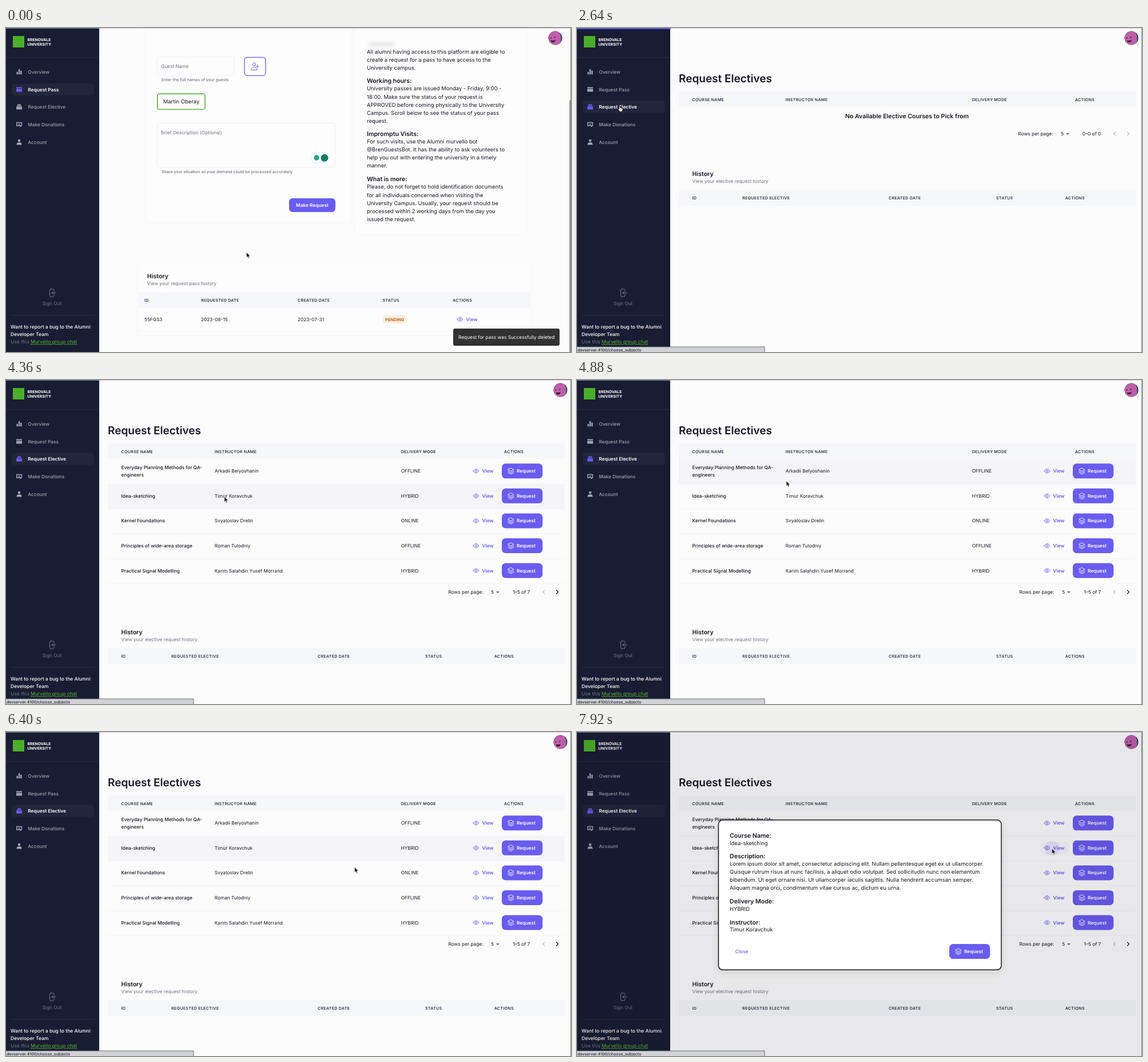
These frames come from a looping animation (988 by 567 pixels, 8000 ms). An HTML page:

```html
<!DOCTYPE html>
<html lang="en">
<head>
<meta charset="utf-8">
<title>Alumni portal</title>
<style>
html, body { margin: 0; width: 100%; height: 100%; overflow: hidden; background: #fcfcfd; }
svg { display: block; width: 100%; height: 100%; --accent: #695cf0; --ink: #15181f; --muted: #6c727e; }
text { font: 400 8.3px Inter, sans-serif; fill: var(--ink); text-rendering: geometricPrecision; white-space: pre; }
.bold { font-weight: 600; }
.medium { font-weight: 500; }
.body { font-size: 9.44px; }
.heading { font-size: 10.6px; font-weight: 600; }
.title { font-size: 19px; font-weight: 600; }
.th { font-size: 7.1px; font-weight: 600; letter-spacing: .28px; fill: #2f3746; }
.hint { font-size: 7.05px; font-weight: 500; fill: var(--muted); }
.muted { fill: var(--muted); }
.accent { fill: var(--accent); }
.white { fill: #fff; }
.nav { fill: #9da4ae; }
.brand { font-size: 6.8px; font-weight: 700; fill: #fff; }
.footer { font-size: 8.55px; }
.dim { fill: #6f7687; }
.link { fill: #55b52f; text-decoration: underline; }
.badge { font-size: 7.3px; font-weight: 600; fill: #b5560d; }
.url { font-size: 7px; font-weight: 500; fill: #222428; }
.mid { text-anchor: middle; }
.end { text-anchor: end; }
.line { fill: none; stroke: currentColor; stroke-linecap: round; stroke-linejoin: round; }
.card { fill: #fdfdfe; filter: drop-shadow(0 1px 4px #11192705); }
.input { fill: #fdfdfe; stroke: #e8eaf0; stroke-width: .7; }

.t { animation: 8s step-end infinite; }
.first { animation-name: first; }
.second { animation-name: second; }
.empty { animation-name: empty; }
.loaded { animation-name: loaded; }
.history { animation-name: history; }
.row0 { animation-name: row0; }
.row1 { animation-name: row1; }
.row2 { animation-name: row2; }
.navHover { animation-name: navHover; }
.hand { animation-name: hand; }
.arrow { animation-name: arrow; }
.status { animation-name: status; }
.viewHover { animation: viewHover 8s linear infinite; }
.statusBar { animation: statusBar 8s linear infinite; }
.toast { animation: toast 8s linear infinite; }
.progress { animation: progress 8s ease-out infinite; }
.navRipple { animation: navRipple 8s linear infinite; }
.viewRipple { animation: viewRipple 8s linear infinite; }
.modal { animation: modal 8s linear infinite; }
.cursor { animation: cursor 8s ease-in-out infinite; }

@keyframes first { 0% { opacity: 1 } 32.9%, 100% { opacity: 0 } }
@keyframes second { 0% { opacity: 0 } 32.9%, 100% { opacity: 1 } }
@keyframes empty { 0% { opacity: 1 } 53.4%, 100% { opacity: 0 } }
@keyframes loaded { 0% { opacity: 0 } 53.4%, 100% { opacity: 1 } }
@keyframes history { 0% { transform: none } 53.4%, 100% { transform: translateY(186px) } }
@keyframes row0 { 0% { opacity: 0 } 60% { opacity: 1 } 65.5%, 100% { opacity: 0 } }
@keyframes row1 { 0%, 53.4% { opacity: 1 } 60% { opacity: 0 } 65.5% { opacity: 1 } 80.4% { opacity: 0 } 83% { opacity: 1 } 98.4%, 100% { opacity: 0 } }
@keyframes row2 { 0% { opacity: 0 } 80.4% { opacity: 1 } 83%, 100% { opacity: 0 } }
@keyframes navHover { 0% { opacity: 0 } 9.5%, 100% { opacity: 1 } }
@keyframes hand { 0% { opacity: 0 } 10.9% { opacity: 1 } 41%, 100% { opacity: 0 } }
@keyframes arrow { 0% { opacity: 1 } 10.9% { opacity: 0 } 41%, 100% { opacity: 1 } }
@keyframes status { 0% { opacity: 0 } 10%, 100% { opacity: 1 } }
@keyframes statusBar { 0%, 25.5% { width: 118px } 27.5%, 100% { width: 329px } }
@keyframes toast { 0%, 28.4% { opacity: 1 } 30%, 100% { opacity: 0 } }
@keyframes progress {
  0%, 18% { width: 0; opacity: 1 }
  20% { width: 79px }
  27.5% { width: 120px }
  30%, 33% { width: 158px; opacity: .85 }
  36% { width: 988px; opacity: .85 }
  38.5%, 100% { width: 988px; opacity: 0 }
}
@keyframes navRipple {
  0%, 16.9% { r: 3px; opacity: 0 }
  17% { r: 5px; opacity: .14 }
  17.5% { r: 8px; opacity: .14 }
  22% { r: 75px; opacity: .1 }
  27%, 100% { r: 80px; opacity: 0 }
}
@keyframes viewHover { 0%, 86.5% { opacity: 0 } 89.5%, 100% { opacity: 1 } }
@keyframes viewRipple { 0%, 97.8% { r: 3px; opacity: 0 } 98% { r: 5px; opacity: .12 } 99%, 100% { r: 13px; opacity: .12 } }
@keyframes modal { 0%, 98.3% { opacity: 0 } 98.9%, 100% { opacity: 1 } }
@keyframes cursor {
  0%, .4% { transform: translate(420.5px, 392.5px) }
  10.5% { transform: translate(74px, 136px) }
  13%, 40.4% { transform: translate(73px, 136px) }
  48%, 51.5% { transform: translate(386px, 211.5px) }
  61%, 62.4% { transform: translate(366px, 176.5px) }
  72%, 73% { transform: translate(560px, 208px) }
  75.5%, 77.5% { transform: translate(590px, 222px) }
  80% { transform: translate(609.5px, 236.5px) }
  87.5%, 100% { transform: translate(830.5px, 204px) }
}
</style>
</head>
<body>
<svg id="stage" viewBox="0 0 988 567"></svg>
<script>
const text = (x, y, string, cls = '') => `<text x="${x}" y="${y}" class="${cls}">${string}</text>`;
const lines = (x, y, step, list, cls) => list.map((s, i) => text(x, y + i * step, s, cls)).join('');
const box = (x, y, w, h, r, attrs) => `<rect x="${x}" y="${y}" width="${w}" height="${h}" rx="${r}" ${attrs}/>`;
const at = (x, y, content, attrs = '') => `<g transform="translate(${x} ${y})" ${attrs}>${content}</g>`;
const stroke = (d, width = 1) => `<path class="line" stroke-width="${width}" d="${d}"/>`;
const headers = (y, cells) => Object.entries(cells).map(([name, x]) => text(x, y, name, 'th')).join('');

const view = (x, y) => at(x, y,
  stroke('M-5 0Q0-7.5 5 0Q0 7.5-5 0Z', .9) + '<circle class="line" r="1.7" stroke-width=".9"/>', 'color="#695cf0"')
  + text(x + 10.5, y + 3, 'View', 'bold accent');

const requestButton = (x, y) => box(x, y - 13, 71.3, 26, 6.5, 'class="accent"')
  + at(x + 16, y, stroke('M0-5L5-2.3 0 .4-5-2.3ZM-5 .3L0 3 5 .3M-5 2.8L0 5.5 5 2.8', .9), 'color="#fff"')
  + text(x + 26, y + 3, 'Request', 'bold white');

const navIcons = [
  '<path d="M-4.5 0h2.4v4.5h-2.4zM-1.2-4.5h2.4v9h-2.4zM2.1-2h2.4v6.5h-2.4z"/>',
  '<path d="M-5-4H5V-2H-5ZM-5-.8H5V4H-5Z"/>',
  '<path d="M-3-4.5H3V-3H-3ZM-4-2.5H4V-1H-4ZM-5-.5H5V4.5H-5Z"/>',
  '<path fill-rule="evenodd" d="M-5-4H5V3H3V5L1 3H-5ZM-3.5-2.5V1.5H3.5V-2.5Z"/><circle r="1.3"/>',
  '<circle cy="-2.5" r="2.3"/><path d="M-4.5 5Q-4.5 .6 0 .6T4.5 5Z"/>'
];
const navNames = ['Overview', 'Request Pass', 'Request Elective', 'Make Donations', 'Account'];

const sidebar = active => box(0, 0, 163, 567, 0, 'fill="#191d33"')
  + box(12, 14, 20, 20, 0, 'fill="#4bae2b"')
  + lines(37.5, 23, 8, ['BRENOVALE', 'UNIVERSITY'], 'brand')
  + box(0, 51, 163, .8, 0, 'fill="#2a3046"') + box(8, 502.5, 147, .8, 0, 'fill="#2a3046"')
  + navNames.map((name, i) => {
    const y = 76.7 + i * 30.7, on = i === active;
    return (on ? box(10, y - 10.5, 144, 21, 5, 'fill="#22263c"') : '')
      + at(23, y, navIcons[i], `fill="${on ? '#695cf0' : '#9da4ae'}"`)
      + text(38.3, y + 3.1, name, on ? 'bold white' : 'medium nav');
  }).join('')
  + at(81, 463.5, stroke('M-4.5-2.5V-5Q-4.5-6.5-3-6.5H1.5Q3-6.5 3-5V-2.5M-4.5-2.5V5Q-4.5 6.5-3 6.5H1.5Q3 6.5 3 5V2.5M6 0H-1M1-2L-1 0 1 2', .9), 'color="#858c9b"')
  + text(80.5, 485, 'Sign Out', 'mid dim')
  + lines(8, 526.3, 13, ['Want to report a bug to the Alumni', 'Developer Team'], 'footer medium white')
  + text(8, 552.3, 'Use this <tspan class="link">Murvello group chat</tspan>', 'footer dim');

const avatar = x => at(x, 17.5, `<circle r="12" fill="#17415c"/>
  <path d="M-11.5 3.5A12 12 0 0 1 7-9.7Q13 1 7.5 9.4A12 12 0 0 1-11.5 3.5Z" fill="#bd5fa9"/>
  <path d="M-7.5 4Q-3 6 .5 3Q-1 8-4.5 7.5T-7.5 4Z" fill="#201626"/>
  <circle cx="-8" cy="0" r="1" fill="#201626"/><circle cx="-1" cy="-1" r="1" fill="#201626"/>`);

const passPage = () => box(163, 0, 825, 567, 0, 'fill="#fcfcfd"')
  + box(245, -10, 358, 350, 8, 'class="card"') + box(611, -10, 299, 370, 8, 'class="card"')
  + box(232, 412, 685, 125, 8, 'class="card"')
  + box(634, 26, 44, 5, 2, 'fill="#ddd" style="filter:blur(3px)"')
  + box(264.5, 51, 134.5, 32, 5, 'class="input"') + text(271, 70.4, 'Guest Name', 'muted')
  + text(272, 93.4, 'Enter the full names of your guests', 'hint')
  + box(417, 51.3, 37, 32, 5, 'fill="#fff" stroke="#695cf0" stroke-width="1.3"')
  + at(435, 67, '<circle class="line" cx="-1" cy="-3.5" r="2.6"/>'
    + stroke('M-6 6Q-6 1.5-1 1.5T4 6ZM5-2.5V2.5M2.5 0H7.5'), 'color="#695cf0"')
  + box(264.7, 115.2, 83.3, 27.2, 3.5, 'fill="#fff" stroke="#4f9f31" stroke-width="1.4"')
  + text(274.7, 132.2, 'Martin Oberay', 'body')
  + box(264.5, 166.5, 311, 77.5, 5, 'class="input"')
  + text(271, 186, 'Brief Description (Optional)', 'muted')
  + text(272, 254, 'Share your situation so your demand could be processed accurately', 'hint')
  + box(533, 218.5, 33, 17.5, 8.7, 'fill="#fff" stroke="#e6e8ec" stroke-width=".7"')
  + '<circle cx="543" cy="227" r="4.8" fill="#2da58b"/><circle cx="557" cy="227.3" r="6.5" fill="#147a68"/>'
  + box(495, 298, 81, 24, 6, 'class="accent"') + text(535.5, 313.2, 'Make Request', 'bold white mid')
  + lines(631, 44.6, 14.1, ['All alumni having access to this platform are eligible to',
    'create a request for a pass to have access to the', 'University campus.'], 'body')
  + text(631, 96.2, 'Working hours:', 'heading')
  + lines(631, 109.4, 14.15, ['University passes are issued Monday - Friday, 9:00 -',
    '18:00. Make sure the status of your request is', 'APPROVED before coming physically to the University',
    'Campus. Scroll below to see the status of your pass', 'request.'], 'body')
  + text(631, 189.4, 'Impromptu Visits:', 'heading')
  + lines(631, 202, 14.15, ['For such visits, use the Alumni murvello bot',
    '@BrenGuestsBot. It has the ability to ask volunteers to',
    'help you out with entering the university in a timely', 'manner.'], 'body')
  + text(631, 268.3, 'What is more:', 'heading')
  + lines(631, 281.4, 14.15, ['Please, do not forget to hold identification documents',
    'for all individuals concerned when visiting the', 'University Campus. Usually, your request should be',
    'processed within 2 working days from the day you', 'issued the request.'], 'body')
  + text(246.8, 438.4, 'History', 'heading') + text(246.8, 450.3, 'View your request pass history', 'muted')
  + box(232, 463, 685, 26, 0, 'fill="#f6f7f9"')
  + headers(478.6, { ID: 242, 'REQUESTED DATE': 341, 'CREATED DATE': 510, STATUS: 658.5, ACTIONS: 781 })
  + text(242, 512.8, '55FGS3') + text(341, 512.8, '2023-08-15') + text(510, 512.8, '2023-07-31')
  + box(659, 502.5, 41.5, 14.5, 3.5, 'fill="#fdf0dc"') + text(679.7, 512.5, 'PENDING', 'badge mid')
  + view(794, 509.8) + box(232, 530.5, 685, .8, 0, 'fill="#f1f2f5"')
  + box(985, 126, 3, 441, 1.5, 'fill="#999ba1"') + avatar(960.5) + sidebar(1)
  + box(10, 127.6, 144, 21, 5, 'fill="#fff" fill-opacity=".04" class="t navHover"')
  + '<circle class="navRipple" cx="73" cy="138" fill="#fff" clip-path="url(#navClip)"/>'
  + `<g class="toast">${box(782, 526, 186, 30, 3, 'fill="#313132"')
    + text(791, 544.2, 'Request for pass was Successfully deleted', 'white')}</g>`;

const pager = (y, shift, range, next) => text(771.5 + shift, y + 3, 'Rows per page:')
  + text(846.3 + shift, y + 3, '5') + `<path d="M${855 + shift} ${y - 1}h6l-3 3z" fill="#666"/>`
  + text(916.3, y + 3, range, 'end')
  + at(940, y, stroke('M1.5-3L-1.5 0 1.5 3', 1.2), 'color="#b9bbc0"')
  + at(964, y, stroke('M-1.5-3L1.5 0-1.5 3', 1.2), `color="${next}"`);

const courses = [
  [['Everyday Planning Methods for QA-', 'engineers'], 'Arkadii Belyoshanin', 'OFFLINE'],
  [['Idea-sketching'], 'Timur Koravchuk', 'HYBRID'],
  [['Kernel Foundations'], 'Svyatoslav Drelin', 'ONLINE'],
  [['Principles of wide-area storage'], 'Roman Tulodniy', 'OFFLINE'],
  [['Practical Signal Modelling'], 'Karim Salahdin Yusef Morrand', 'HYBRID']
];
const courseRow = ([name, teacher, mode], i) => {
  const y = 159.3 + i * 43.55;
  return (i < 3 ? box(178, y - 21, 799, 43.5, 0, `fill="#f5f5f7" class="t row${i}"`) : '')
    + box(178, y + 22.4, 799, .8, 0, 'fill="#f1f2f5"')
    + lines(201.5, y + 3 - (name.length - 1) * 6.5, 13, name, 'medium')
    + text(364.7, y + 3, teacher) + text(690.7, y + 3, mode)
    + (i === 1 ? box(811, y - 11, 48, 22, 6, 'class="viewHover" fill="#695cf00a"')
      + '<circle class="viewRipple accent" cx="831" cy="203.5"/>' : '')
    + view(822, y) + requestButton(867, y);
};

const electivesPage = () => box(163, 0, 825, 567, 0, 'fill="#fcfcfd"')
  + text(178, 95, 'Request Electives', 'title')
  + box(178, 111, 799, 27, 0, 'fill="#f6f7f9"')
  + headers(127.7, { 'COURSE NAME': 201.5, 'INSTRUCTOR NAME': 364.7, 'DELIVERY MODE': 690.7, ACTIONS: 871 })
  + `<g class="t empty">${text(577, 157.5, 'No Available Elective Courses to Pick from', 'heading mid')
    + pager(185, 0, '0–0 of 0', '#b9bbc0')}</g>`
  + `<g class="t loaded">${courses.map(courseRow).join('') + pager(371, 2, '1–5 of 7', '#111')}</g>`
  + `<g class="t history">${text(201.5, 259.2, 'History', 'heading')
    + text(201.5, 271, 'View your elective request history', 'muted')
    + box(178, 283, 799, 28, 0, 'fill="#f6f7f9"')
    + headers(299.6, { ID: 201.5, 'REQUESTED ELECTIVE': 289, 'CREATED DATE': 545, STATUS: 733, ACTIONS: 853.7 })}</g>`
  + avatar(969.5) + sidebar(2);

const modal = () => box(0, 0, 988, 567, 0, 'fill="#0a0c14" fill-opacity=".08"')
  + box(247.4, 154, 494.6, 262.3, 7.5, 'fill="#fefefe" stroke="#14161d" stroke-width="1.5" style="filter:drop-shadow(0 4px 7px #0000001a)"')
  + text(267, 184.8, 'Course Name:', 'heading') + text(267, 198, 'Idea-sketching', 'body')
  + text(267, 221.3, 'Description:', 'heading')
  + lines(267, 234, 14.15, ['Lorem ipsum dolor sit amet, consectetur adipiscing elit. Nullam pellentesque eget ex ut ullamcorper.',
    'Quisque rutrum risus at nunc facilisis, a aliquet odio volutpat. Sed sollicitudin nunc non elementum',
    'bibendum. Ut eget ornare nisi. Ut ullamcorper iaculis sagittis. Nulla hendrerit accumsan semper.',
    'Aliquam magna orci, condimentum vitae cursus ac, dictum eu urna.'], 'body')
  + text(267, 300.2, 'Delivery Mode:', 'heading') + text(267, 313, 'HYBRID', 'body')
  + text(267, 336.8, 'Instructor:', 'heading') + text(267, 349.4, 'Timur Koravchuk', 'body')
  + text(276.8, 387, 'Close', 'medium accent') + requestButton(651, 384);

const statusBar = '<rect class="statusBar" x="-1" y="558" height="10" fill="#d0d2d6" stroke="#5c5e64" stroke-width=".9"/>'
  + text(1, 565.9, 'devserver:4100/choose_subjects', 'url');

const cursor = `<g class="t arrow"><path d="M0 0V9.3L2.2 7.3 3.6 10.5 5.3 9.8 3.9 6.7H6.7Z"
    fill="#08080a" stroke="#fff" stroke-width=".7"/></g>
  <g class="t hand"><path d="M.3 1.2Q.3 0 1.2 0T2.2 1.2V3.8Q4-.0 3.9 4.2 5.3 3.3 5.5 4.7 6.9 4 6.9 5.6
    V7.5Q6.5 10.5 4.5 10.5H2.5Q.8 9.5-1.5 6Q-1.5 4.7 .3 6Z" fill="#fff" stroke="#0b0b12" stroke-width=".9"/></g>`;

document.getElementById('stage').innerHTML = `
  <clipPath id="navClip"><rect x="10" y="127.6" width="144" height="21" rx="5"/></clipPath>
  <g class="t first">${passPage()}</g>
  <g class="t second">${electivesPage()}</g>
  ${box(987, 0, 1, 567, 0, 'fill="#85868c"')}
  ${box(0, 0, 988, 1, 0, 'fill="#b9bbcf" fill-opacity=".7"')}
  <rect class="progress accent" height="2"/>
  <g class="modal">${modal()}</g>
  <g class="t status">${statusBar}</g>
  <g class="cursor">${cursor}</g>`;
</script>
</body>
</html>
```
